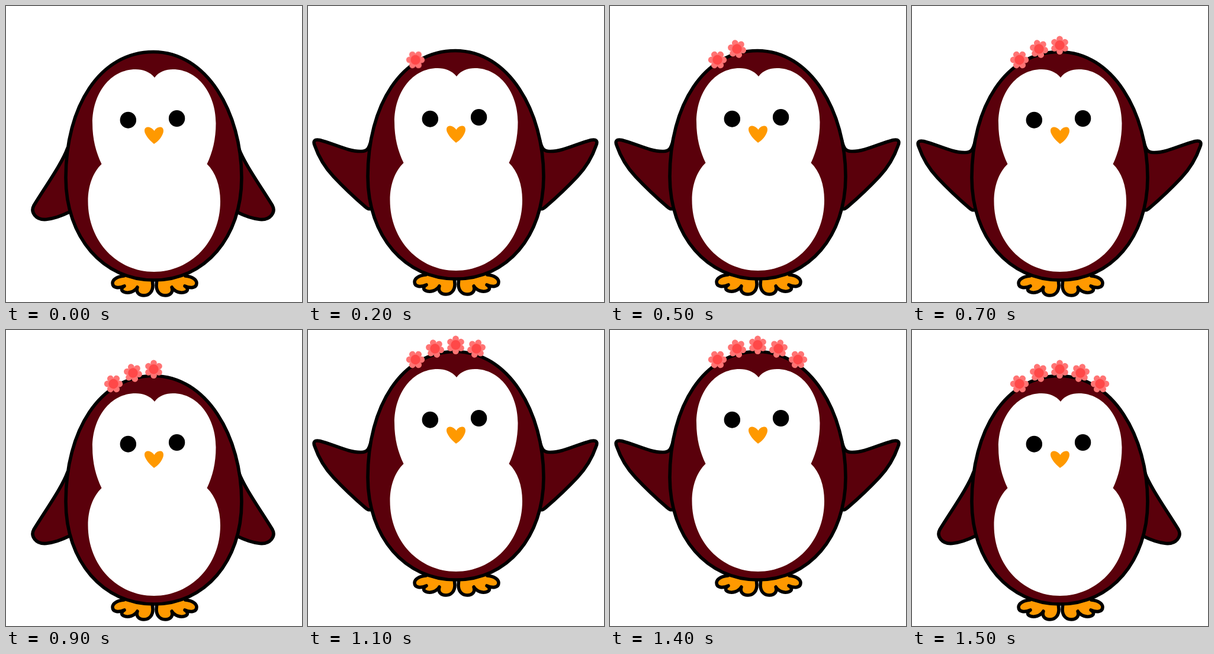
Animation of 500x500 px, one loop 1.6 s. Source, as an HTML page:

```html
<!DOCTYPE html>
<html lang="en">
<head>
<meta charset="utf-8">
<title>Hopping penguin</title>
<style>
html, body { margin: 0; width: 100%; height: 100%; overflow: hidden; background: #fff; }
svg { display: block; width: 100%; height: 100%; }
.line { fill: #5a000b; stroke: #000; stroke-width: 5.6; stroke-linejoin: round; stroke-linecap: round; }
.foot { fill: #f90; }
.hop, .crown, .up, .down, .crown use { animation: 1.6s step-end infinite; }
.hop { animation-name: hop; }
.crown { animation-name: crown; }
.up { animation-name: up; }
.down { animation-name: down; }
.crown :nth-child(1) { animation-name: bloom1; }
.crown :nth-child(2) { animation-name: bloom2; }
.crown :nth-child(3) { animation-name: bloom3; }
.crown :nth-child(4) { animation-name: bloom4; }
.crown :nth-child(5) { animation-name: bloom5; }

/* 16 poses of 100 ms: 6.25% each */
@keyframes hop {
  0%, 18.75%, 37.5%, 43.75%, 56.25%, 62.5%, 75%, 81.25%, 93.75%, 100% { transform: translateY(0); }
  12.5%, 31.25% { transform: translateY(-2px); }
  6.25%, 25%, 50%, 68.75%, 87.5% { transform: translateY(-41px); }
}
@keyframes crown {
  0%, 12.5%, 31.25%, 56.25%, 75%, 93.75%, 100% { transform: translateY(0); }
  43.75%, 62.5%, 81.25% { transform: translateY(0); }
  6.25%, 25%, 50%, 68.75%, 87.5% { transform: translateY(-41px); }
}
@keyframes up {
  0%, 18.75%, 37.5%, 56.25%, 75%, 93.75%, 100% { visibility: hidden; }
  6.25%, 25%, 43.75%, 62.5%, 81.25% { visibility: visible; }
}
@keyframes down {
  0%, 18.75%, 37.5%, 56.25%, 75%, 93.75%, 100% { visibility: visible; }
  6.25%, 25%, 43.75%, 62.5%, 81.25% { visibility: hidden; }
}
@keyframes bloom1 { 0% { visibility: hidden; } 6.25%, 100% { visibility: visible; } }
@keyframes bloom2 { 0% { visibility: hidden; } 25%, 100% { visibility: visible; } }
@keyframes bloom3 { 0% { visibility: hidden; } 43.75%, 100% { visibility: visible; } }
@keyframes bloom4 { 0% { visibility: hidden; } 62.5%, 100% { visibility: visible; } }
@keyframes bloom5 { 0% { visibility: hidden; } 81.25%, 100% { visibility: visible; } }
</style>
</head>
<body>
<svg viewBox="0 0 500 500">
  <defs>
    <path id="wingDown" d="M104 240C95 265 70 300 47 337C41 348 50 362 68 360.5C82 359 95 354 107 348"/>
    <path id="wingUp" d="M107 228C103 242 101 247.5 90 247.5C68 248 45 235 20 228.5C11 226.5 8 230 11.5 238C18 257 28 274 43 290C60 308 79 326 96 340.500C100 344 102 345.500 106 344.500"/>
    <path id="foot" d="M199 456C188 457 180 462 180 468C180 477 191 477 200 473C195 476 194 480 198 482.500C206 486.500 217 483 222 475C219 483 224 489 233 489C243 489 248 481 248 472L247 460"/>
    <g id="flower">
      <g fill="#ff7474">
        <g id="petals"><circle cy="-10.3" r="5.4"/><circle cy="10.3" r="5.4"/></g>
        <use href="#petals" transform="rotate(60)"/>
        <use href="#petals" transform="rotate(120)"/>
        <circle r="9.5"/>
      </g>
      <circle r="8.2" fill="#ff4848"/>
    </g>
  </defs>

  <g class="hop">
    <g class="line down">
      <use href="#wingDown"/>
      <use href="#wingDown" transform="translate(497) scale(-1 1)"/>
    </g>
    <g class="line up">
      <use href="#wingUp"/>
      <use href="#wingUp" transform="translate(498) scale(-1 1)"/>
    </g>
    <g class="line foot">
      <use href="#foot"/>
      <use href="#foot" transform="translate(502) scale(-1 1)"/>
    </g>
    <path class="line" d="M249 77.5C339 77.5 398 180 398 290C398 391 336 463 250 463C164 463 101 391 101 290C101 170 158 77.5 249 77.5Z"/>
    <path fill="#fff" d="M251 121C243 111 231 107 219 107C176 107 146 148 146 198C146 225 152 247 161.5 267C147 281 138.5 303 138.5 330C138.5 398 188 449 250 449C312 449 362 398 362 330C362 303 354 281 339.5 267C349 247 354.5 225 354.5 198C354.5 148 324 107 282 107C270 107 258 111 251 121Z"/>
    <ellipse cx="206.3" cy="192.7" rx="13.7" ry="14"/>
    <ellipse cx="288.6" cy="190" rx="13.7" ry="14"/>
    <path fill="#f90" d="M250.5 211C247 206 243 204.5 239 204.5C234 205 233 210 235 215C238 222 244 228 250 233C257 229 263 222 265.5 214C267 209 265 204.5 261 204.5C257 204.5 253 206.5 250.5 211Z"/>
  </g>

  <g class="crown">
    <use href="#flower" transform="translate(181.5 91) rotate(30)"/>
    <use href="#flower" transform="translate(214.5 72.5) rotate(-18)"/>
    <use href="#flower" transform="translate(249.5 66.3)"/>
    <use href="#flower" transform="translate(284.5 72.5) rotate(18)"/>
    <use href="#flower" transform="translate(317.5 91) rotate(-30)"/>
  </g>
</svg>
</body>
</html>
```
